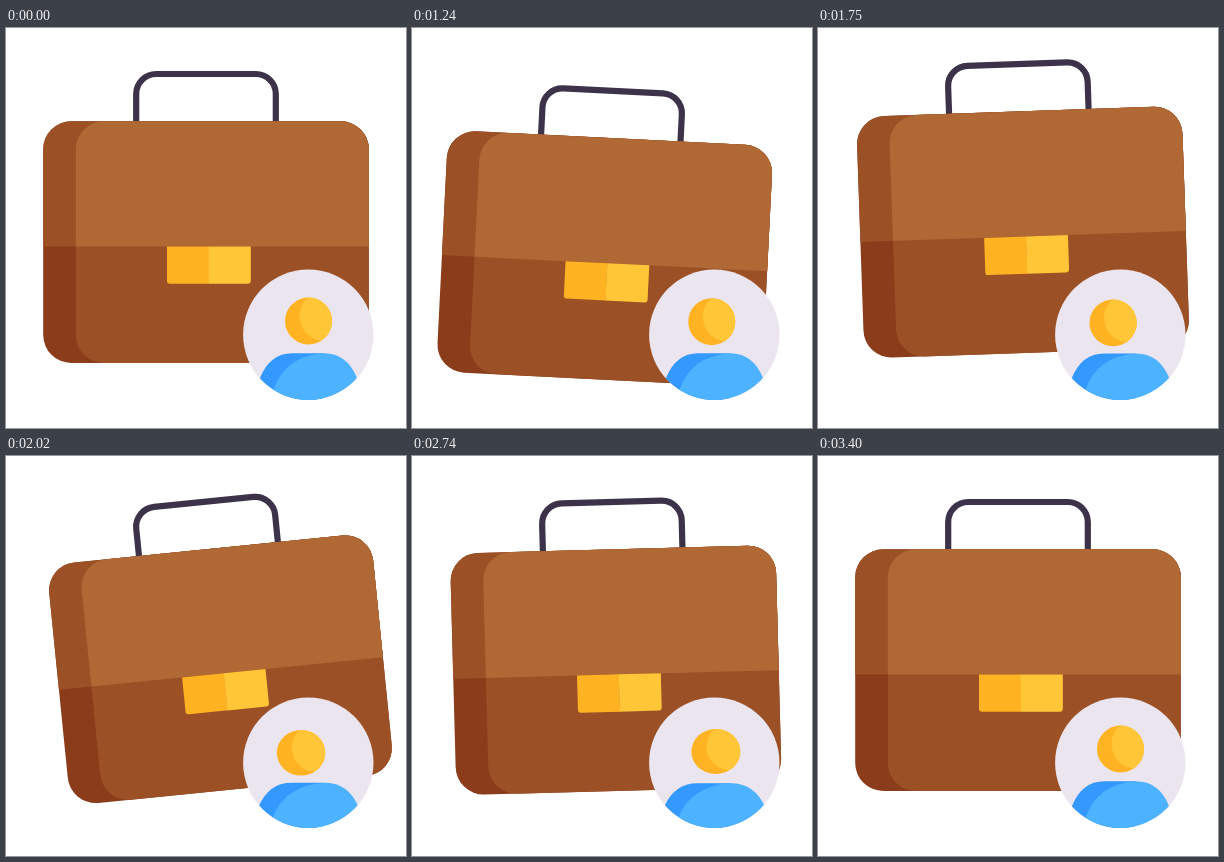
These frames come from a looping animation (400x400 px, 3430 ms). An HTML page:

```html
<!DOCTYPE html>
<html lang="en">
<head>
<meta charset="utf-8">
<title>Briefcase</title>
<style>
  html, body { margin: 0; width: 100%; height: 100%; overflow: hidden; background: #fff; }
  svg { display: block; width: 100%; height: 100%; }

  .bag, .person, .head {
    animation: 3430ms cubic-bezier(.37, 0, .63, 1) infinite;
  }
  .bag { transform-origin: 200px 69px; animation-name: swing, bounce; }
  .person { transform-origin: 302px 372px; animation-name: squash; }
  .head { animation-name: sway; }

  @keyframes swing {
    0%, 30.3% { rotate: 0deg; }
    43.6% { rotate: 7deg; }
    56.3% { rotate: -7.1deg; }
    68.2% { rotate: 5deg; }
    82.8% { rotate: -2.2deg; }
    97.4%, 100% { rotate: 0deg; }
  }
  @keyframes bounce {
    0%, 29% { translate: 0 0; }
    43.2% { translate: 0 33px; }
    52.5% { translate: 0 -12.5px; }
    63.9% { translate: 0 8px; }
    79.9%, 100% { translate: 0 0; }
  }
  @keyframes squash {
    0%, 48.1% { scale: 1 1; }
    58.9% { scale: 1.03 .97; }
    69.4% { scale: 1 1; }
    79.9% { scale: 1.04 .96; }
    94.8%, 100% { scale: 1 1; }
  }
  @keyframes sway {
    0%, 30% { translate: 0 0; }
    43.7% { translate: -6.5px 1.5px; }
    56.9% { translate: -8px 1.5px; }
    70.3% { translate: 5px 1.5px; }
    81.6% { translate: 1px -.8px; }
    96.2%, 100% { translate: 0 0; }
  }
</style>
</head>
<body>
<svg viewBox="0 0 400 400">
  <defs>
    <clipPath id="flap"><path d="M30 90H370V218.5H30z"/></clipPath>
    <clipPath id="badge"><circle cx="302.3" cy="306.7" r="65.2"/></clipPath>
  </defs>

  <g class="bag">
    <path d="M130.2 96V66a20 20 0 0 1 20-20h99.6a20 20 0 0 1 20 20v30" fill="none" stroke="#3c3249" stroke-width="6.2"/>
    <rect x="37.2" y="93.3" width="325.6" height="241.7" rx="28" fill="#8a3c1b"/>
    <rect x="69.8" y="93.3" width="293" height="241.7" rx="28" fill="#9c5025"/>
    <g clip-path="url(#flap)">
      <rect x="37.2" y="93.3" width="325.6" height="241.7" rx="28" fill="#9c5025"/>
      <rect x="69.8" y="93.3" width="293" height="241.7" rx="28" fill="#b06835"/>
    </g>
    <path d="M161 218.5h42v37.3h-39a3 3 0 0 1-3-3z" fill="#ffb222"/>
    <path d="M202.8 218.5h42v34.3a3 3 0 0 1-3 3h-39z" fill="#ffc738"/>
  </g>

  <circle cx="302.3" cy="306.7" r="65.2" fill="#ebe5ef"/>
  <g clip-path="url(#badge)">
    <g class="person">
      <path d="M248 380L254 350Q264 325.3 286 325.3H318V380z" fill="#3399ff"/>
      <path d="M264 380L267.5 362Q279 328 318 325.3Q341 325.3 351 350L357 380z" fill="#4db2ff"/>
      <g class="head">
        <circle cx="302.5" cy="293" r="23.5" fill="#ffb222"/>
        <path d="M302.5 269.5A23.5 23.5 0 0 1 315.5 312.6C292 310 287 280 302.5 269.5z" fill="#ffc738"/>
      </g>
    </g>
  </g>
</svg>
</body>
</html>
```
